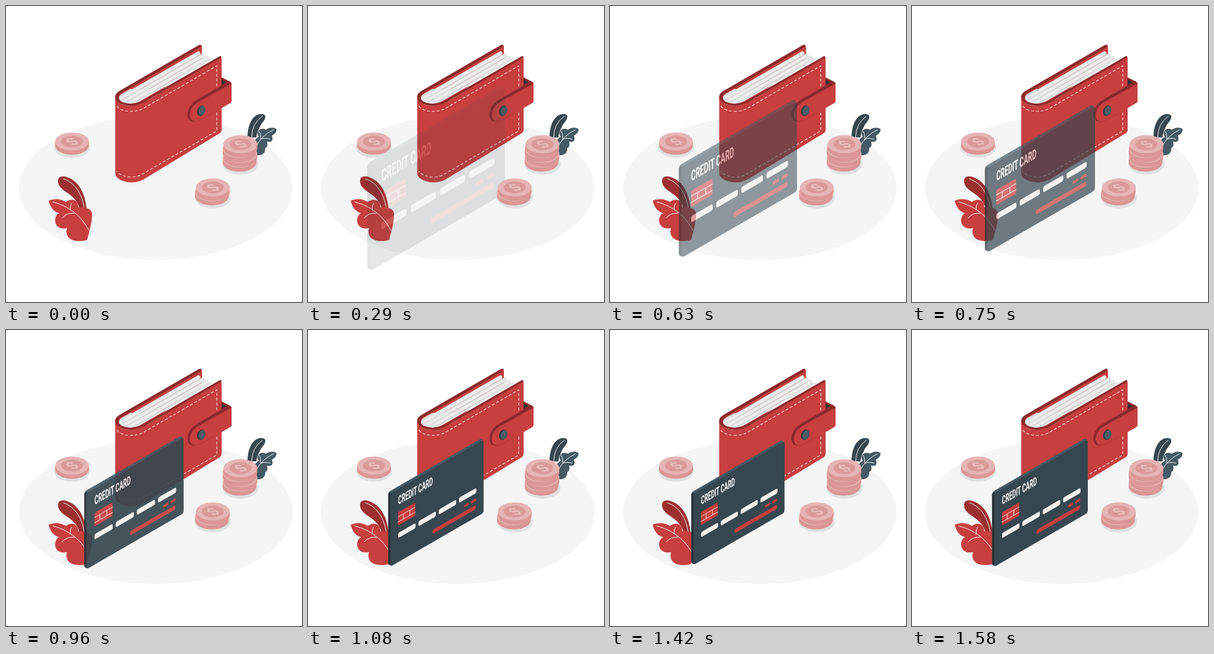
Animation of 500 by 500 pixels, one loop 1.62 s. Source, as an HTML page:

```html
<!DOCTYPE html>
<html lang="en">
<head>
<meta charset="utf-8">
<title>Wallet and card</title>
<style>
  html, body { margin: 0; width: 100%; height: 100%; overflow: hidden; background: #fff; }
  svg { display: block; width: 100vw; height: 100vh; }
  .line { fill: none; stroke: #fff; stroke-width: 1; stroke-linecap: round; }
  .stitch { fill: none; stroke: #f6dcdc; stroke-width: 1.2; stroke-dasharray: 5 3.2; }
  .title { font: 700 20px Roboto, "Liberation Sans", sans-serif; fill: #fff; }
  .sign { font: 700 24px Roboto, "Liberation Sans", sans-serif; fill: #e8bcbc; text-anchor: middle; }
</style>
</head>
<body>
<svg viewBox="0 0 500 500" xmlns="http://www.w3.org/2000/svg">
  <defs>
    <g id="coin">
      <path d="M-28.5 0V7A28.5 15.3 0 0 0 28.5 7V0Z" fill="#db9696"/>
      <ellipse rx="28.5" ry="15.3" fill="#e6b4b4"/>
      <ellipse rx="18.5" ry="10" fill="#d99a9a"/>
      <text class="sign" transform="matrix(.866 -.5 .866 .5 0 0)" y="8.500">$</text>
    </g>
    <clipPath id="pocket">
      <path d="M191 155Q191 151 196 148L325 76H349V90L231 158Q222 164 210 165Q191 163 191 155Z"/>
    </clipPath>
  </defs>

  <ellipse cx="253" cy="307.5" rx="231" ry="121.5" fill="#f5f5f5"/>

  <g id="rightLeaves">
    <path fill="#455a64" d="M421 252C415 240 417 226 427 221C421 212 430 204 439 209C446 204 454 205 457 208C457 215 452 217 449 219C453 228 447 231 441 229C443 238 440 238 438 240C438 249 433 253 421 252Z"/>
    <path class="line" d="M422 238Q431 219 452 209M430 224Q431 215 427 211M430 225Q438 222 446 225"/>
    <path fill="#37474f" d="M408 222C408 205 414 184 430 182.500Q438 182 438 187C438 194 431 197 428 206Q424 213 423 222Z"/>
    <path class="line" d="M415 222Q415 199 433 186"/>
  </g>

  <g id="leftLeaves">
    <path fill="#9c3031" d="M88 297C87 288 95 286 103 289C125 297 133 318 136 341L124 341C120 328 113 322 102 314.500C94 309 88.500 304 88 297Z"/>
    <path class="line" d="M97 292C117 298 129 319 132 341"/>
    <path fill="#c73f3f" d="M72 329C81 325 92 325 101 331C111 324 122 327 122 340C136 340 145 342 145.500 352C145 369 140 383 137 395C126 399 106 398 103 386C101 380 103 377 103 375C93 378 83 373 83 362C83 355 87 351 90 350C79 347 75 339 72 329Z"/>
    <path class="line" d="M79 331C106 338 127 354 140 379M109 345Q107 339 111 333M115 350Q102 349 95 358"/>
  </g>

  <g id="wallet">
    <path fill="#c73f3f" d="M184.500 154Q184.500 148 191 144L326 66Q331 64 331 70V90L232 165Q210 175 184.500 160Z"/>
    <path fill="#8a2a2c" d="M184.500 154Q184.500 148 191 144L326 66Q329 64.500 330.500 67L327 70.500L195 147Q190 150 190.500 156L196 164Z"/>
    <g clip-path="url(#pocket)">
      <path fill="#dfdfdf" d="M188 140H352V170H188Z"/>
      <g id="sheets" fill="none" stroke-linecap="round"></g>
    </g>
    <path fill="#c73f3f" d="M184.500 154C186 164 199 169 211 168.500Q224 168 233 163L360 86.500Q364 84.500 364.300 89V209Q364 213 360 215.500L234 292Q224 298 211 298C197 297 184.500 291 184.500 283Z"/>
    <path fill="none" stroke="#8a2a2c" stroke-width="3.600" stroke-linecap="round" d="M186.300 153C188 163 199 166.500 211 166.700Q223 166 232 161L362 86.300"/>
    <path class="stitch" d="M187 169C193 176 202 178 211 178Q223 178 232 173L356 101V211L232 283Q223 289 211 289C201 289 192 285 187 279"/>
  </g>

  <g id="clasp">
    <path fill="#8a2a2c" d="M364 120.500L378 127.500Q381 129 381 133L364 144Z"/>
    <path fill="#263238" d="M364.500 124L372 128.500L364.500 133Z"/>
    <path fill="#8a2a2c" d="M381 130V160L326 193C317 198 306 195 306.500 183C307 171 315 163 324 157.500L375 128Z"/>
    <path fill="#c73f3f" d="M381 131V160Q381 163 378 164.500L330 192C320 198 310 195 310.500 184C311 173 318 166 327 161Z"/>
    <path fill="none" stroke="#b43839" stroke-width="1" d="M316 195.500Q322 196 330 191.500L350 180"/>
    <ellipse cx="329.700" cy="177" rx="6.600" ry="9" transform="rotate(20 329.700 177)" fill="#2d3b42"/>
    <ellipse cx="331" cy="177" rx="5.500" ry="8" transform="rotate(20 331 177)" fill="#4a5c65"/>
  </g>

  <g id="card" opacity="0">
    <g transform="matrix(1 -.5774 0 1 139 276)">
      <rect x="-3.700" y="-4.400" width="158" height="124" rx="4" fill="#455a64"/>
      <path fill="#455a64" d="M-2 -4L2 0H157L153 -4Z"/>
      <path fill="#263238" d="M-3.700 -1Q-3 -3 -1 -2L4 2V124Q1 124 -2 120Q-3.700 119 -3.700 116Z"/>
      <rect width="158" height="124" rx="4" fill="#37474f"/>
      <text class="title" transform="translate(13 26.800) scale(.472 1)">CREDIT CARD</text>
      <rect x="13" y="39.500" width="29" height="22.500" rx="2" fill="#c73f3f"/>
      <path class="line" stroke-opacity=".85" d="M13 47.300H42M13 56H42M21.800 47.300V56M33 47.300V56"/>
      <g id="bars" fill="#f0f0f0"></g>
      <g fill="#c73f3f">
        <rect x="71" y="103" width="74" height="7" rx="2.500"/>
        <rect x="124.600" y="91.800" width="8.500" height="4.600" rx="1.500"/>
        <rect x="136.800" y="91.800" width="8.500" height="4.600" rx="1.500"/>
      </g>
    </g>
  </g>

  <g id="coins"></g>
</svg>
<script>
  const el = id => document.getElementById(id);

  // Paper edges inside the wallet
  let sheets = '';
  for (let k = 0; k < 4; k++) {
    const x = 325 + k * 7, y = 80 + k * 4;
    const run = `M${x - 138} ${y + 79.7}L${x} ${y}`;
    sheets += `<path d="${run}" stroke="#dadada" stroke-width="7"/>` +
              `<path d="${run}" stroke="#ececec" stroke-width="4.500"/>`;
  }
  el('sheets').innerHTML = sheets;

  // Coin piles: x, y of the top face, number of coins
  const pile = (x, y, n) => {
    let out = `<ellipse cx="${x}" cy="${y + 8 * n + 1}" rx="30.500" ry="18.500" fill="#e0e0e0"/>`;
    for (let k = n - 1; k >= 0; k--) {
      out += `<use href="#coin" x="${x - k % 2 * 1.5}" y="${y + 8 * k}"/>`;
    }
    return out;
  };
  el('coins').innerHTML = pile(111.5, 229, 1) + pile(396, 233.5, 4) + pile(349.3, 306.5, 2);

  el('bars').innerHTML = [0, 1, 2, 3].map(k =>
    `<rect x="${13 + 34.4 * k}" y="74.600" width="29.600" height="8.700" rx="2.500"/>`).join('');

  const LOOP = 1620, DURATION = 1570, FPS = 24;
  const CX = 216, CY = 291.5;

  const curve = (s, a, b) => 3 * (1 - s) ** 2 * s * a + 3 * (1 - s) * s * s * b + s ** 3;

  // cubic-bezier(.36, -.01, .5, 1.38)
  function ease(x) {
    if (x >= 1) return 1;
    let lo = 0, hi = 1;
    for (let k = 0; k < 24; k++) {
      const mid = (lo + hi) / 2;
      if (curve(mid, .36, .5) < x) lo = mid; else hi = mid;
    }
    return curve(lo, -.01, 1.38);
  }

  const card = el('card');
  const start = performance.now();

  // The motion advances in steps of 1/24 s
  function draw() {
    const t = (performance.now() - start) % LOOP;
    const step = Math.floor((t + 3.4) * FPS / 1000);
    const p = ease(step * 1000 / FPS / DURATION);
    const scale = 1.5 - .5 * p;
    card.setAttribute('opacity', step < 3 ? 0 : Math.min(1, Math.max(0, p)));
    card.setAttribute('transform',
      `translate(${CX} ${CY}) scale(${scale}) translate(${-CX} ${-CY})`);
    requestAnimationFrame(draw);
  }
  draw();
</script>
</body>
</html>
```
